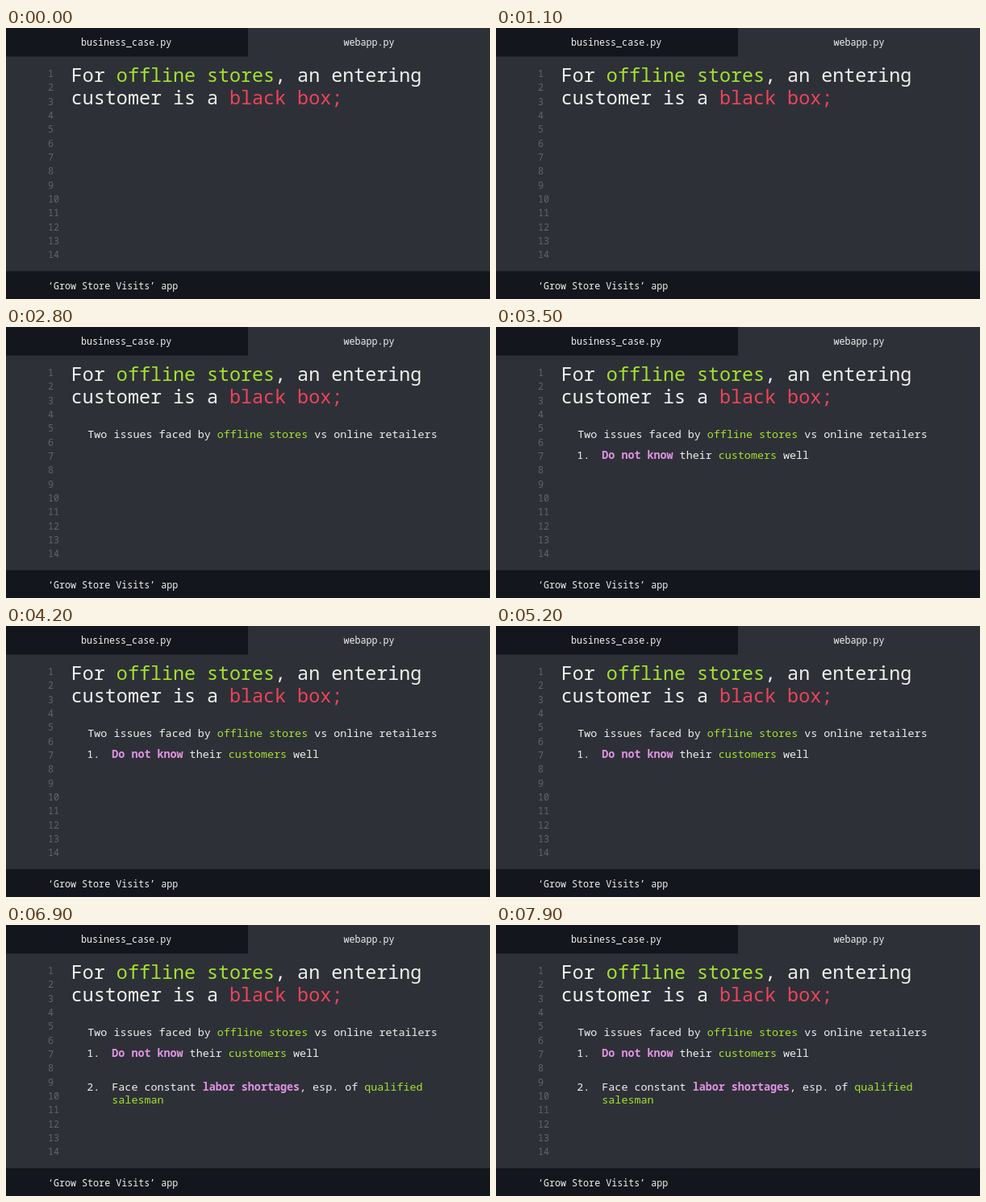
These frames come from a looping animation (600x337 px, 8 s). An HTML page with a canvas:

```html
<!DOCTYPE html>
<html lang="en">
<head>
<meta charset="utf-8">
<title>Business case</title>
<style>
html, body { margin: 0; width: 100%; height: 100%; overflow: hidden; background: #2e3038; }
canvas { display: block; width: 600px; height: 337px; }
</style>
</head>
<body>
<canvas id="stage"></canvas>
<script>
const LOOP = 8000;
const WHITE = '#f1f1ec', GREEN = '#a5e22d', RED = '#ee4458', PINK = '#e193e2';
const DIM = '#62646b', PANEL = '#2e3038', DARK = '#14161e';
const SMALL = 11.7, BODY = 13.38, TITLE = 23.37;

const canvas = document.getElementById('stage');
const ctx = canvas.getContext('2d');
const ratio = window.devicePixelRatio || 1;
canvas.width = 600 * ratio;
canvas.height = 337 * ratio;
ctx.scale(ratio, ratio);

// Each line is a row of coloured runs, shown from its start time on.
const line = (start, size, x, y, ...runs) => ({ start, size, x, y, runs });
const lines = [
  line(0, SMALL, 93, 22, ['business_case.py', WHITE]),
  line(0, SMALL, 418.5, 22, ['webapp.py', WHITE]),
  line(0, SMALL, 52, 325, ['‘Grow Store Visits’ app', WHITE]),
  line(0, TITLE, 80.8, 67, ['For ', WHITE], ['offline stores', GREEN], [', an entering', WHITE]),
  line(0, TITLE, 80.8, 95, ['customer is a ', WHITE], ['black box;', RED]),
  line(1200, BODY, 101.3, 137.5, ['Two issues faced by ', WHITE], ['offline stores', GREEN], [' vs online retailers', WHITE]),
  line(3400, BODY, 100.3, 164, ['1.', WHITE]),
  line(3400, BODY, 131.3, 164, ['Do not know', PINK, 700], [' their ', WHITE], ['customers', GREEN], [' well', WHITE]),
  line(5600, BODY, 100.3, 206, ['2.', WHITE]),
  line(5600, BODY, 131.3, 206, ['Face constant ', WHITE], ['labor shortages', PINK, 700], [', esp. of ', WHITE], ['qualified', GREEN]),
  line(5600, BODY, 131.3, 222, ['salesman', GREEN])
];
for (let n = 1; n <= 14; n++) {
  lines.push(line(0, SMALL, 52, 61 + (n - 1) * 17.32, [String(n), DIM]));
}

function box(color, x, y, w, h) {
  ctx.fillStyle = color;
  ctx.fillRect(x, y, w, h);
}

function write({ size, x, y, runs }) {
  for (const [text, color, weight = 400] of runs) {
    ctx.font = `${weight} ${size}px "Noto Sans Mono", "DejaVu Sans Mono", monospace`;
    ctx.fillStyle = color;
    ctx.fillText(text, x, y);
    x += ctx.measureText(text).width;
  }
}

function draw(now) {
  const t = now % LOOP;
  box(PANEL, 0, 0, 600, 337);
  box(DARK, 0, 0, 300, 35.5);
  box(DARK, 0, 302.4, 600, 34.6);
  lines.filter(l => t >= l.start).forEach(write);
  requestAnimationFrame(draw);
}
requestAnimationFrame(draw);
</script>
</body>
</html>
```
